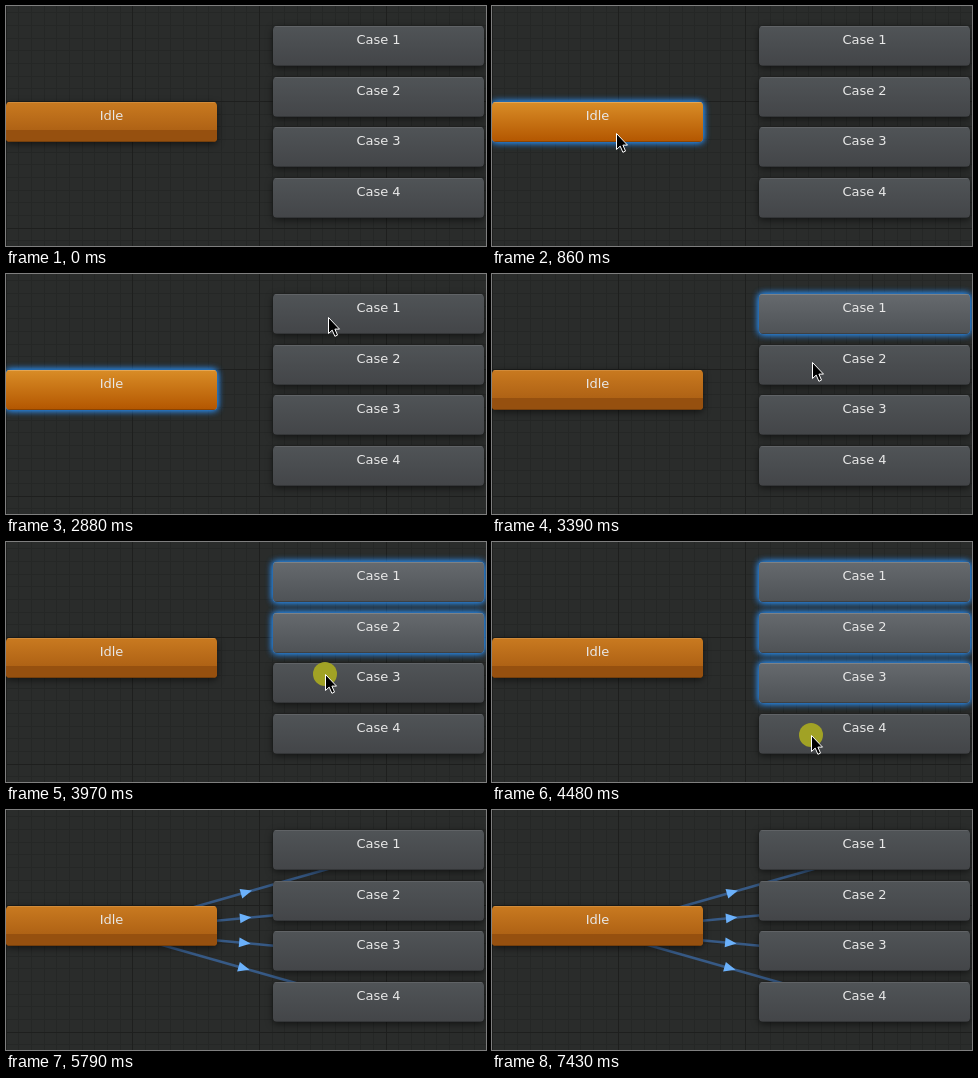
Animation of 480 by 240 pixels, one loop 7990 ms. Source, as an HTML page with a canvas:

```html
<!DOCTYPE html>
<html lang="en">
<head>
<meta charset="utf-8">
<title>State machine transitions</title>
<style>
html, body { margin: 0; width: 100%; height: 100%; overflow: hidden; background: #2a2c2b; }
canvas { display: block; }
</style>
</head>
<body>
<canvas id="stage" width="480" height="240"></canvas>
<script>
const ctx = document.getElementById('stage').getContext('2d');
const LOOP = 7990, STEP = 64, PRESS = 60, LINKED = 5790;
const W = 211, H = 40;
const arrow = new Path2D('M0 0V16L3.7 12.6 6.4 18.8 9 17.6 6.4 11.6H11Z');

// on / off: when the node is selected
const idle = { label: 'Idle', x: 0, y: 96, on: 860, off: 3010, orange: true };
const cases = [0, 1, 2, 3].map(i => ({
  label: 'Case ' + (i + 1), x: 267, y: Math.round(20 + 50.6 * i), on: 3010 + 510 * i, off: LINKED
}));
const nodes = [idle, ...cases];

// Each pointer trip lists [departure time, x, y]; the first point is where it appears
const trips = [
  { hide: 1366, path: [[300, 198, 175], [364, 124, 126], [1110, 460, 240]] },
  { hide: 5050, path: [[2430, 390, 122], [2494, 322, 42], [3200, 320, 95],
                       [3650, 319, 131], [4100, 319, 192], [4790, 500, 192]] },
  { hide: 7430, path: [[6480, 407, 198], [6544, 205, 209], [7370, 214, 199]] }
];

const within = (t, a, b) => t >= a && t < b;

function pointerAt(t) {
  const trip = trips.find(k => within(t, k.path[0][0], k.hide));
  if (!trip) return null;
  const i = trip.path.findLastIndex(k => t >= k[0]);
  const [t0, x1, y1] = trip.path[i], [, x0, y0] = trip.path[Math.max(0, i - 1)];
  const steps = i === 1 ? 7 : 5;
  const p = Math.min(1, (Math.floor((t - t0) / STEP) + 1) / steps);
  const ease = p * (2 - p);
  return [Math.round(x0 + (x1 - x0) * ease), Math.round(y0 + (y1 - y0) * ease)];
}

function box(x, y, w, h) {
  ctx.beginPath();
  ctx.roundRect(x, y, w, h, 4);
}

function halo(n, color, blur, dy) {
  ctx.save();
  ctx.fillStyle = ctx.shadowColor = color;
  ctx.shadowBlur = blur;
  ctx.shadowOffsetY = dy;
  box(n.x, n.y, W, H);
  ctx.fill();
  ctx.restore();
}

function gridLines(gap, color) {
  ctx.fillStyle = color;
  for (let x = 126.9 % gap; x < 480; x += gap) ctx.fillRect(Math.floor(x), 0, 1, 240);
  for (let y = 95.5 % gap; y < 240; y += gap) ctx.fillRect(0, Math.floor(y), 480, 1);
}

function drawLink(to) {
  const dx = to.x - idle.x, dy = to.y - idle.y, len = Math.hypot(dx, dy);
  ctx.save();
  ctx.translate(idle.x + W / 2, idle.y + H / 2);
  ctx.rotate(Math.atan2(dy, dx));
  ctx.translate(0, 4.4);
  ctx.strokeStyle = '#375a86';
  ctx.lineWidth = 2.5;
  ctx.beginPath();
  ctx.moveTo(0, 0);
  ctx.lineTo(len, 0);
  ctx.stroke();
  ctx.translate(len / 2, 0);
  ctx.fillStyle = '#6bb1fb';
  ctx.beginPath();
  ctx.moveTo(-5.5, -5);
  ctx.lineTo(6, 0);
  ctx.lineTo(-5.5, 5);
  ctx.fill();
  ctx.restore();
}

function drawNode(n, t) {
  const { x, y, orange } = n, selected = within(t, n.on, n.off);
  const [top, bottom, edge] = orange
    ? (selected ? ['#d98d27', '#b35600', '#e3a655'] : ['#c97a20', '#a45810', '#d18b3a'])
    : (selected ? ['#666a6e', '#4e5256', '#7d8286'] : ['#505457', '#434548', '#606366']);
  if (selected) {
    halo(n, '#2a8cee', 7, 0);
    halo(n, '#2a8cee', 7, 0);
  } else {
    halo(n, 'rgba(0,0,0,.75)', 7, 2);
  }

  const fill = ctx.createLinearGradient(0, y, 0, y + H);
  fill.addColorStop(0, top);
  fill.addColorStop(1, bottom);
  ctx.save();
  box(x, y, W, H);
  ctx.clip();
  ctx.fillStyle = fill;
  ctx.fillRect(x, y, W, H);
  if (orange && !selected) {
    ctx.fillStyle = '#96500f';
    ctx.fillRect(x, y + 28, W, 12);
  }
  ctx.fillStyle = edge;
  ctx.fillRect(x, y, W, 1);
  ctx.fillStyle = 'rgba(0,0,0,.22)';
  ctx.fillRect(x, y + H - 1, W, 1);
  ctx.restore();

  ctx.fillStyle = '#e8e8e8';
  ctx.fillText(n.label, x + W / 2, y + 18);
}

function drawPointer(t) {
  const at = pointerAt(t);
  if (!at) return;
  ctx.save();
  ctx.translate(...at);
  if (nodes.some(n => within(t, n.on - PRESS, n.on))) {
    ctx.fillStyle = '#a1a225';
    ctx.beginPath();
    ctx.arc(0, 1, 12, 0, 7);
    ctx.fill();
  }
  ctx.translate(0.5, 1.5);
  ctx.fillStyle = '#000';
  ctx.strokeStyle = '#fff';
  ctx.fill(arrow);
  ctx.stroke(arrow);
  ctx.restore();
}

function draw(t) {
  ctx.fillStyle = '#2a2c2b';
  ctx.fillRect(0, 0, 480, 240);
  gridLines(12.66, '#252726');
  gridLines(126.6, '#1e1f1e');
  if (t >= LINKED) cases.forEach(drawLink);
  ctx.font = '13px "DejaVu Sans", sans-serif';
  ctx.textAlign = 'center';
  nodes.forEach(n => drawNode(n, t));
  drawPointer(t);
}

let start;
function tick(now) {
  start ??= now;
  draw((now - start) % LOOP);
  requestAnimationFrame(tick);
}
requestAnimationFrame(tick);
</script>
</body>
</html>
```
